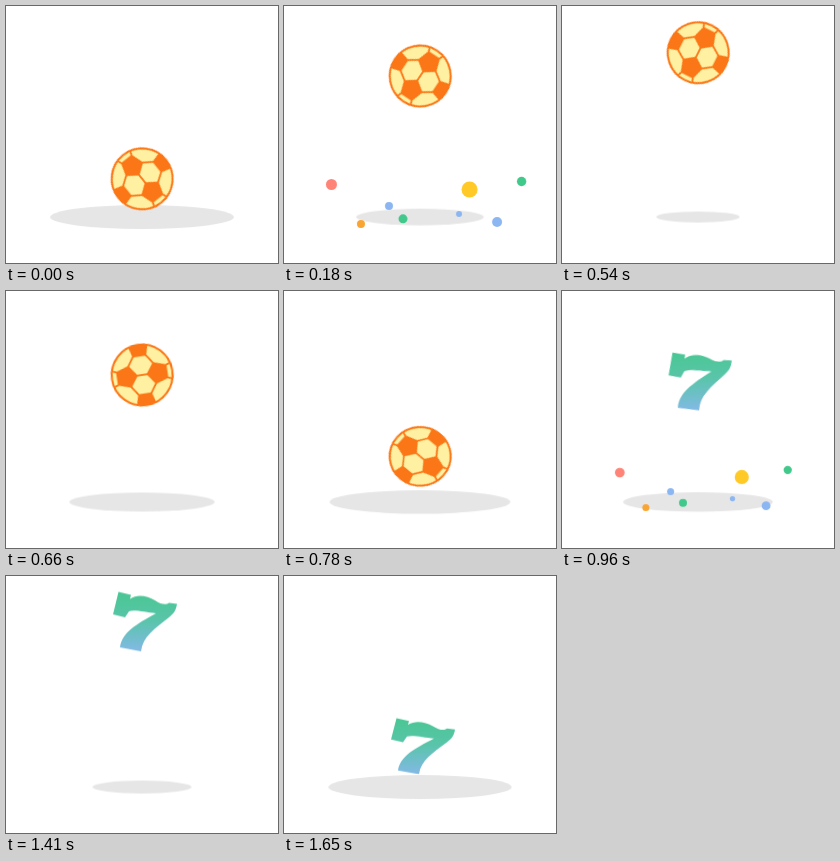
Write an HTML page without scripts that moves like this. It is 272x257 px and loops after 1680 ms.

```html
<!DOCTYPE html>
<html lang="en">
<head>
<meta charset="utf-8">
<title>Bouncing ball and seven</title>
<style>
  html, body { margin: 0; width: 100%; height: 100%; overflow: hidden; background: #fff; }
  svg { display: block; width: 100vw; height: 100vh; }

  :root { --hop: 840ms; --loop: 1680ms; }

  .shadow { transform-origin: 136px 211px; animation: shadow var(--hop) infinite; }
  .burst { transform-origin: 136px 205px; animation: burst var(--hop) infinite; }
  .hop { animation: hop var(--hop) infinite; }
  .squash { transform-origin: 136px 46px; animation: squash var(--hop) linear infinite; }
  .ball { animation: first var(--loop) step-end infinite; }
  .seven { animation: second var(--loop) step-end infinite; }
  .spin { animation: spin var(--hop) cubic-bezier(.35, .28, .6, .67) infinite; }
  .tilt { transform-origin: 139px 45px; animation: tilt var(--hop) infinite; }

  /* quick rise, short rest at the top, eased drop */
  @keyframes hop {
    0% { transform: translateY(127px); animation-timing-function: cubic-bezier(.215, .61, .355, 1); }
    51%, 67% { transform: none; animation-timing-function: cubic-bezier(.45, .02, .45, .98); }
    100% { transform: translateY(127px); }
  }
  @keyframes squash {
    0%, 87%, 100% { transform: none; }
    96.4% { transform: scaleY(.94); }
  }
  @keyframes shadow {
    0% { transform: none; animation-timing-function: cubic-bezier(.4, .2, .8, .8); }
    21.43% { transform: scale(.696); animation-timing-function: linear; }
    35.7%, 63.7% { transform: scale(.437); animation-timing-function: cubic-bezier(.39, .575, .565, 1); }
    100% { transform: none; }
  }
  @keyframes burst {
    0% { transform: scale(.1); opacity: 0; animation-timing-function: cubic-bezier(.25, .55, .6, .95); }
    2% { transform: scale(.2); opacity: 1; animation-timing-function: cubic-bezier(.25, .55, .6, .95); }
    21.43% { transform: none; opacity: 1; animation-timing-function: linear; }
    31.5% { transform: scale(1.06); opacity: 1; }
    31.6%, 100% { transform: scale(1.06); opacity: 0; }
  }
  @keyframes spin {
    from { transform: rotate(-39deg); }
    to { transform: rotate(333deg); }
  }
  @keyframes tilt {
    0% { transform: rotate(-6deg); }
    35.7% { transform: rotate(-3deg); }
    54%, 100% { transform: none; }
  }
  @keyframes first { 0% { visibility: visible; } 50%, 100% { visibility: hidden; } }
  @keyframes second { 0% { visibility: hidden; } 50%, 100% { visibility: visible; } }
</style>
</head>
<body>
<svg viewBox="0 0 272 257" preserveAspectRatio="none">
  <defs>
    <linearGradient id="mint" gradientUnits="userSpaceOnUse" x1="139" y1="16" x2="139" y2="75">
      <stop offset="0" stop-color="#4ac794"/>
      <stop offset=".45" stop-color="#58c5a8"/>
      <stop offset="1" stop-color="#83b9e6"/>
    </linearGradient>
    <clipPath id="disc"><circle r="31"/></clipPath>
    <!-- half of the ball's panels; the other half is the same turned by 180 degrees -->
    <g id="panels">
      <path fill="#fb7616" d="M0-5.5L10-12.8L6.2-24.5H-6.2L-10-12.8Z M19.5-6.2V6.2L33 10V-10Z"/>
      <path fill="none" d="M0-5.5V0 M10-12.8L19.5-6.2 M-10-12.8L-19.5-6.2 M6.2-24.5L9-32 M-6.2-24.5L-9-32"/>
    </g>
  </defs>

  <ellipse class="shadow" cx="136" cy="211" rx="92" ry="12" fill="#e6e6e6"/>

  <g class="burst">
    <circle cx="47.5" cy="178.5" r="5.5" fill="#ff8478"/>
    <circle cx="185.5" cy="183.5" r="8" fill="#ffca28"/>
    <circle cx="77" cy="218" r="4" fill="#f9a533"/>
    <g fill="#40c98b">
      <circle cx="237.5" cy="175.5" r="4.7"/>
      <circle cx="119" cy="212.8" r="4.5"/>
    </g>
    <g fill="#8cb6f2">
      <circle cx="213" cy="216" r="5"/>
      <circle cx="105" cy="200" r="4"/>
      <circle cx="175" cy="208" r="3"/>
    </g>
  </g>

  <g class="hop">
    <g class="squash">
      <g class="ball" transform="translate(136.2 46.7)">
        <g class="spin">
          <circle r="31" fill="#fff0a2"/>
          <g clip-path="url(#disc)" stroke="#fb7616" stroke-width="1.8" stroke-linejoin="round">
            <use href="#panels"/>
            <use href="#panels" transform="rotate(180)"/>
          </g>
          <circle r="30.5" fill="none" stroke="#fb7616" stroke-width="2"/>
        </g>
      </g>
      <g class="seven">
        <path class="tilt" fill="url(#mint)" d="M112.5 15.5L125 18.5L124 22.5C132 17 142 20 149 24C155 28 160 29 163 26.5L171 27.5C170 34 168 37 163 41C148 53 137 60 135 75L114 71C116 56 130 48 150 37C140 36 128 33 123 35L119 41L107 38Z"/>
      </g>
    </g>
  </g>
</svg>
</body>
</html>
```
